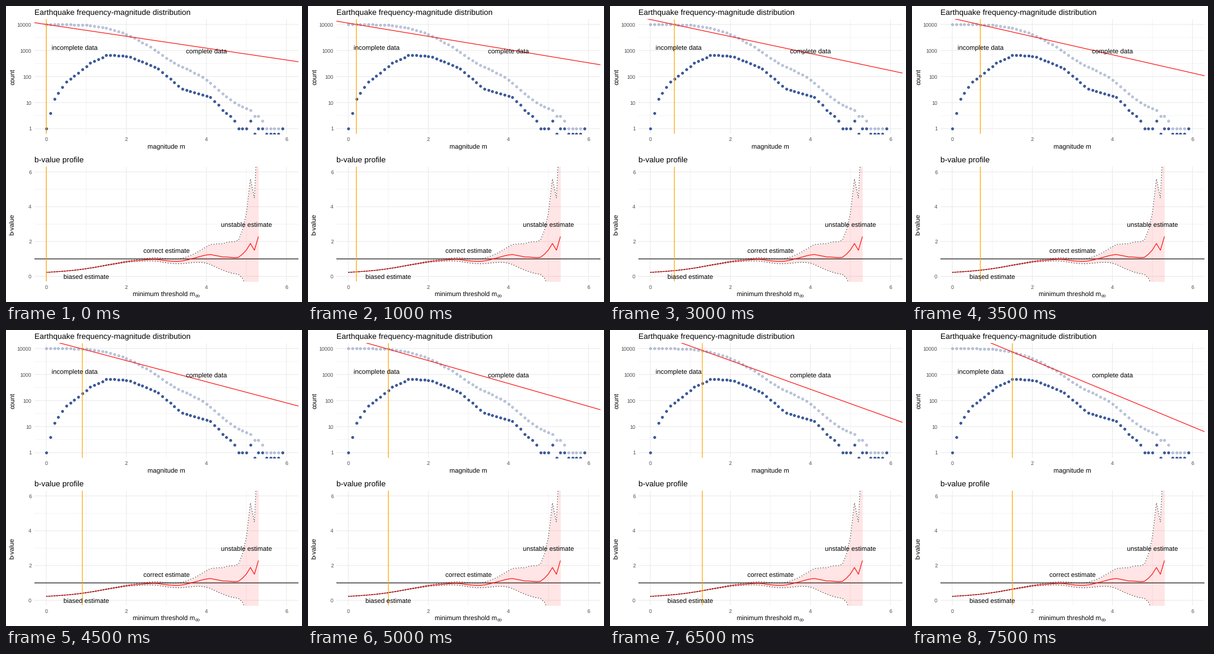
These frames come from a looping animation (500 px wide and 500 px high, 8 s). A matplotlib script:

```python
import numpy as np
import matplotlib.pyplot as plt
from matplotlib.animation import FuncAnimation

SIZE, DPI = 500, 100
FRAMES, INTERVAL = 16, 500
LEFT, RIGHT = 47.8, 494
BLUE, GRID, GREY = "#3a5898", "#ebebeb", "#4d4d4d"

plt.rcParams.update({
    "font.family": "Liberation Sans",
    "text.hinting": "no_hinting",
    "path.snap": False,
    "lines.solid_capstyle": "butt",
    "lines.dash_capstyle": "butt",
})


def catalogue():
    """Magnitudes drawn from a smooth count curve, plus the rare large events."""
    knots = [0, .1, .2, .5, .8, 1.1, 1.5, 1.7, 2.1, 2.8, 3.4, 4.1, 4.7]
    level = [1, 4, 14, 64, 140, 335, 650, 668, 580, 195, 33, 16, 1.8]
    bins = np.arange(48) / 10
    n = np.rint(10 ** np.interp(bins, knots, np.log10(level))).astype(int)
    large = [4.84, 4.94, 5.04, 5.07, 5.09, 5.27, 5.35, 5.85 + 1e-6]
    return np.append(np.repeat(bins, n), large)


def estimate(cut):
    """Maximum likelihood b-value above a threshold and its error band."""
    m = quakes[quakes >= cut - .05 - 1e-9]
    # the half-bin correction fades out towards the unbinned large events
    half_bin = np.interp(cut, [4, 5.2], [.05, 0])
    b = np.log10(np.e) / (m.mean() - cut + half_bin)
    sigma = np.log(10) * b ** 2 * m.std() / np.sqrt(len(m) - 1)
    return b, 3.2 * sigma


quakes = catalogue()
mags = np.arange(60) / 10
counts = np.bincount(np.rint(quakes * 10).astype(int), minlength=60)
totals = counts[::-1].cumsum()[::-1]
cuts = mags[:54]
b, half = np.transpose([estimate(c) for c in cuts])


def px(n):
    return n * 72 / DPI


def text(x, y, s, size=11, **kw):
    kw = {"ha": "center", "va": "baseline", "color": "black", **kw}
    fig.text(x / SIZE, 1 - y / SIZE, s, fontsize=px(size), rotation_mode="anchor", **kw)


def panel(top, bottom, ylim, major, minor, labels):
    ax = fig.add_axes([LEFT / SIZE, 1 - bottom / SIZE,
                       (RIGHT - LEFT) / SIZE, (bottom - top) / SIZE])
    ax.set(xlim=(-.3, 6.3), ylim=ylim)
    ax.axis("off")
    for xs, ys, width in (((1, 3, 5), minor, .55), ((0, 2, 4, 6), major, 1.1)):
        for x in xs:
            ax.axvline(x, color=GRID, lw=px(width), zorder=0)
        for y in ys:
            ax.axhline(y, color=GRID, lw=px(width), zorder=0)
    for x in (0, 2, 4, 6):
        text(LEFT + (x + .3) / 6.6 * (RIGHT - LEFT), bottom + 12.4, str(x), 8.8, color=GREY)
    for y, label in zip(major, labels):
        y_px = bottom - (y - ylim[0]) / (ylim[1] - ylim[0]) * (bottom - top)
        text(43, y_px + 3.3, label, 8.8, ha="right", color=GREY)
    return ax


def dots(ax, values, alpha):
    # empty bins sit half hidden on the lower edge
    logs = np.log10(np.where(values > 0, values, 10 ** -.2))
    ax.scatter(mags, logs, s=px(4) ** 2, color=BLUE, lw=px(.8), alpha=alpha, zorder=2)


fig = plt.figure(figsize=(SIZE / DPI, SIZE / DPI), dpi=DPI, facecolor="white")

freq = panel(22.4, 215.9, (-.2, 4.2), range(5), np.arange(.5, 4),
             ["1", "10", "100", "1000", "10000"])
dots(freq, totals, .32)
dots(freq, counts, 1)
fit, = freq.plot([], [], color="red", lw=px(1.1), zorder=3)

prof = panel(271.4, 465.4, (-.3, 6.3), (0, 2, 4, 6), (1, 3, 5), "0246")
prof.axhline(1, color="black", lw=px(1.1), zorder=1)
prof.fill_between(cuts, b - half, b + half, color="red", alpha=.1, lw=0, zorder=2)
prof.plot(cuts, b, color="red", lw=px(1.1), zorder=3)
for edge in (b - half, b + half):
    prof.plot(cuts, edge, color="black", lw=px(1.1), ls=(0, (1, 3)), zorder=4)

markers = [ax.axvline(0, color="orange", lw=px(1.2), zorder=5) for ax in (freq, prof)]

text(48, 15.2, "Earthquake frequency-magnitude distribution", 13.2, ha="left")
text(48, 264.2, "b-value profile", 13.2, ha="left")
text(271, 241.4, "magnitude m")
text(214.5, 490.4, "minimum threshold m", ha="left")
text(320, 492.4, "co", 7.7, ha="left")
text(14, 119.6, "count", rotation=90)
text(14, 368.6, "b-value", rotation=90)
text(115.6, 75, "incomplete data")
text(338.9, 81, "complete data")
text(271.2, 418.2, "correct estimate")
text(406.4, 374.2, "unstable estimate")
text(136, 462.2, "biased estimate")


def update(i):
    x = np.array([-.3, 6.3])
    fit.set_data(x, np.log10(totals[i]) - b[i] * (x - cuts[i]))
    for line in markers:
        line.set_xdata([cuts[i]] * 2)
    return [fit, *markers]


anim = FuncAnimation(fig, update, frames=FRAMES, interval=INTERVAL,
                     repeat=True, repeat_delay=0, blit=False)
plt.show()
```
